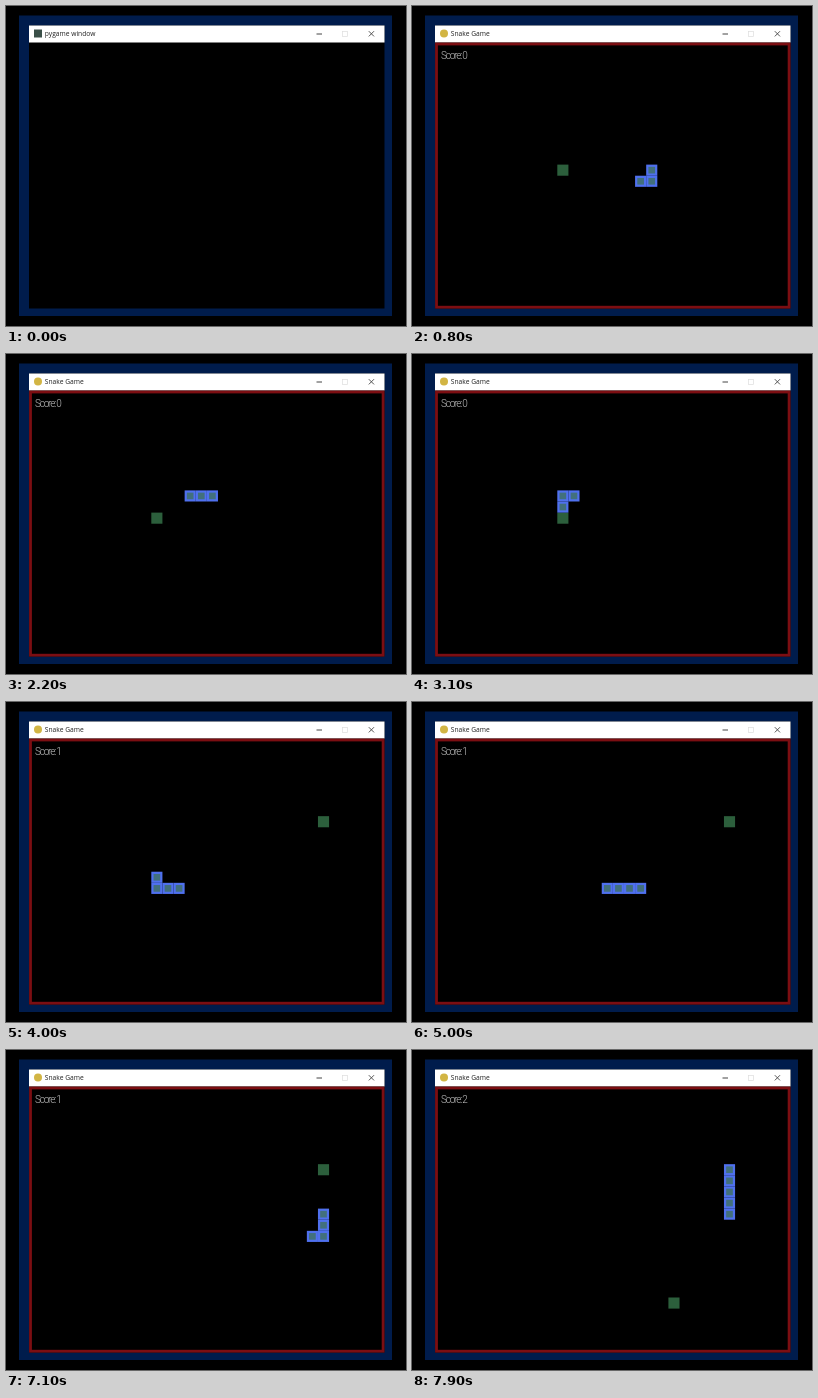
Recreate the animation shown at these times as an HTML page. Size 400x320 px, loop 8000 ms.

```html
<!DOCTYPE html>
<html lang="en">
<head>
<meta charset="utf-8">
<title>Snake Game</title>
<style>
  html, body { margin: 0; width: 100%; height: 100%; overflow: hidden; background: #000; }
  svg { display: block; width: 400px; height: 320px; }
  #title { font: 6.7px "Open Sans", sans-serif; fill: #222; }
  #score { font: 300 10px Roboto, sans-serif; letter-spacing: -1.2px; fill: #c4c4c4; }
</style>
</head>
<body>
<svg viewBox="0 0 400 320">
  <rect x="13" y="9.5" width="373" height="300.5" fill="#001c4c"/>
  <rect x="23" y="19.5" width="355.5" height="283" fill="#000"/>
  <rect x="23" y="19.5" width="355.5" height="17" fill="#fff"/>
  <rect id="icon" x="28" y="23.5" width="8" height="8"/>
  <text id="title" x="38.8" y="30.2"></text>
  <g fill="none" stroke="#444">
    <path d="M310.5 28h5.5"/>
    <rect x="336.5" y="25.5" width="5" height="5" stroke="#ddd" stroke-width=".7"/>
    <path d="M362.8 25.2l5.2 5.2m0-5.2l-5.2 5.2" stroke-width=".9"/>
  </g>
  <g id="game">
    <rect x="24.5" y="38" width="352.6" height="263.2" fill="none" stroke="#7c0e12" stroke-width="2.8"/>
    <text id="score" x="29" y="52.8"></text>
    <g transform="translate(23.1 36.4) scale(11.11)">
      <rect id="food" width="1" height="1" fill="#2c5f3c"/>
      <g id="snake"></g>
    </g>
  </g>
</svg>
<script>
const LOOP = 8000, STEP = 200, GAME_START = 100;
const MEALS = [16, 39]; // steps at which food is eaten
const FOODS = [[11, 11], [26, 7], [21, 19]];
const RUNS = [[1, 0, 5], [0, -1, 3], [-1, 0, 8], [0, 1, 4], [1, 0, 15], [0, -1, 6]];

const path = [[14, 12]];
for (const [dx, dy, count] of RUNS) {
  for (let i = 0; i < count; i++) {
    const [x, y] = path[path.length - 1];
    path.push([x + dx, y + dy]);
  }
}

const el = id => document.getElementById(id);
const square = (x, y, size, fill) =>
  `<rect x="${x}" y="${y}" width="${size}" height="${size}" fill="${fill}"/>`;
const segment = ([x, y]) =>
  square(x, y, 1, "#4f70ee") + square(x + .2, y + .2, .6, "#42707c");

function draw() {
  const t = performance.now() % LOOP;
  const playing = t >= GAME_START;
  const step = Math.floor(t / STEP);
  const score = MEALS.filter(meal => step >= meal).length;
  const head = step + 3;

  el("title").textContent = playing ? "Snake Game" : "pygame window";
  el("icon").setAttribute("fill", playing ? "#d2b544" : "#3a4f48");
  el("icon").setAttribute("rx", playing ? 4 : 0);
  el("game").style.display = playing ? "" : "none";
  el("score").textContent = "Score: " + score;
  el("food").setAttribute("transform", `translate(${FOODS[score]})`);
  el("snake").innerHTML = path.slice(head - 3 - score, head).map(segment).join("");
  requestAnimationFrame(draw);
}
draw();
</script>
</body>
</html>
```
